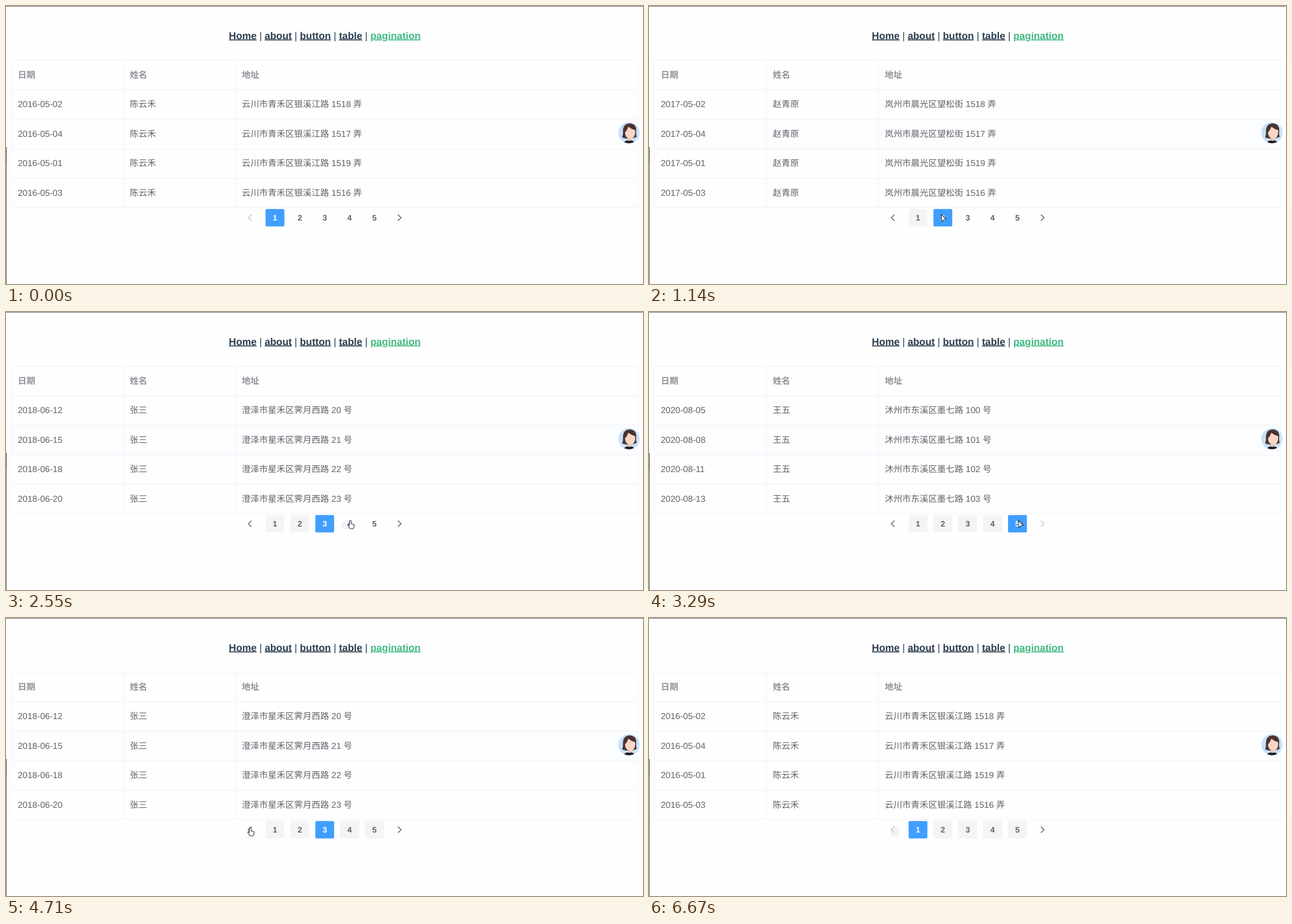
These frames come from a looping animation (1132x495 px, 6870 ms). An HTML page:

```html
<!DOCTYPE html>
<html lang="zh">
<head>
<meta charset="utf-8">
<title>Pagination</title>
<style>
  html, body { margin: 0; width: 100%; height: 100%; overflow: hidden; background: #fefefe; }
  svg { display: block; font: 15.5px "Liberation Sans", "Noto Sans CJK SC", "Noto Sans CJK", sans-serif; fill: #606266; text-rendering: geometricPrecision; }
  .nav { font-size: 17.7px; fill: #2c3e50; text-anchor: middle; }
  .nav tspan { font-weight: bold; text-decoration: underline; }
  .nav .on { fill: #42b983; }
  .head { font-weight: bold; fill: #909399; }
  .grid { fill: none; stroke: #eff1f6; }
  .num { font-size: 14.3px; font-weight: bold; text-anchor: middle; }
  .arrow { fill: none; stroke: #606266; stroke-width: 1.5; }
  .arrow.off { stroke: #c0c4cc; }
  .smudge { fill: #f2f2f2; }
  #cursor path { fill: #fff; stroke: #2b2b33; stroke-width: 1.1; stroke-linejoin: round; }
  #cursor .ban { stroke: #e0485e; stroke-width: 1.6; }
</style>
</head>
<body>
<svg id="stage" width="1132" height="495" viewBox="0 0 1132 495">
  <rect width="1132" height="1" fill="#6e6e70"/>
  <rect y="251" width="1" height="244" fill="#5c5c5e"/>
  <rect y="251" width="1" height="29" fill="#3d3436"/>
  <text class="nav" x="566.500" y="58.500"><tspan>Home</tspan> | <tspan>about</tspan> | <tspan>button</tspan> | <tspan>table</tspan> | <tspan class="on">pagination</tspan></text>

  <rect id="hover" x="10" width="1113" height="52" fill="#fbfdff"/>
  <path class="grid" d="M9.500 96.500H1123.500V358.500H9.500ZM9.500 149.500H1123M9.500 201.500H1123M9.500 254.500H1123M9.500 306.500H1123M208.500 96V358M407.500 96V358"/>
  <g id="table"></g>

  <g id="pager">
    <circle id="smudge4" class="smudge" cx="604" cy="379.500" r="7.500"/>
    <circle id="smudgePrev" class="smudge" cx="437.500" cy="382" r="8.500"/>
    <path id="prev" class="arrow" d="M436.200 371.500L430.700 377L436.200 382.500"/>
    <path id="next" class="arrow" d="M696.500 371.500L702 377L696.500 382.500"/>
  </g>

  <clipPath id="disc"><circle cx="1107" cy="225.700" r="18.800"/></clipPath>
  <g clip-path="url(#disc)">
    <rect x="1088" y="206" width="38" height="40" fill="#c6e1fd"/>
    <path d="M1095 234Q1097 228 1096.500 220Q1098 209 1109 209Q1120 210 1120 221Q1119 229 1121 233Q1108 239 1095 234Z" fill="#4b342f"/>
    <path d="M1097 246Q1098 239 1108 239Q1117 239 1118 246Z" fill="#1d1c20"/>
    <path d="M1105 232h6v7q-3 2.500-6 0Z" fill="#eebfa9"/>
    <path d="M1100 225Q1104 221 1106 215Q1111 219 1118 221Q1119 236 1109 236.500Q1100 235 1100 225Z" fill="#f8d5c4"/>
  </g>

  <g id="cursor">
    <path data-kind="arrow" d="M.5 0L9 8.500L5.200 9.300L1.500 13Z"/>
    <path data-kind="hand" d="M-.5 1.500a1.500 1.500 0 0 1 3 0v4.500l3.800 1q1.800.5 1.600 2.500l-.8 3.800q-.3 1.700-1.600 1.700h-4q-1 0-1.600-1l-3-4.800q-.5-1.600.8-1.700l1.800 1.500Z"/>
    <path data-kind="ban" class="ban" d="M-2.500 4a4.500 4.500 0 1 0 9 0a4.500 4.500 0 1 0 -9 0M-1.100 .9L5.100 7.100"/>
  </g>
</svg>
<script>
const LOOP = 6870, COLS = [21, 220, 419];
const $ = id => document.getElementById(id);

const pages = [
  { month: '2016-05', days: ['02', '04', '01', '03'], name: '陈云禾', road: '云川市青禾区银溪江路', nos: [1518, 1517, 1519, 1516], unit: '弄' },
  { month: '2017-05', days: ['02', '04', '01', '03'], name: '赵青原', road: '岚州市晨光区望松街', nos: [1518, 1517, 1519, 1516], unit: '弄' },
  { month: '2018-06', days: [12, 15, 18, 20], name: '张三', road: '澄泽市星禾区霁月西路', nos: [20, 21, 22, 23], unit: '号' },
  { month: '2019-07', days: [22, 25, 28, 30], name: '李四', road: '汐岭市澜山区禾苑园南路', nos: [50, 51, 52, 53], unit: '号' },
  { month: '2020-08', days: ['05', '08', 11, 13], name: '王五', road: '沐州市东溪区墨七路', nos: [100, 101, 102, 103], unit: '号' }
];

// [time, page]
const turns = [[0, 1], [1060, 2], [1890, 3], [2640, 4], [3290, 5], [4320, 4], [4710, 3], [4880, 2], [5360, 1]];

// Pointer moves: first step, last step, step count, end x, end y, downward bow
const moves = [
  [110, 750, 8, 519, 371, 0],
  [1150, 1710, 7, 563, 371, 0],
  [1980, 2250, 4, 611, 371, 0],
  [2730, 3100, 5, 656, 371, 0],
  [3380, 3950, 7, 434, 374, 11],
  [4040, 4140, 2, 433, 373, 0],
  [5640, 6290, 8, 797, 31, 0],
  [6390, 6670, 4, 789, -20, 0]
];

function add(parent, tag, attrs, text = '') {
  const el = document.createElementNS('http://www.w3.org/2000/svg', tag);
  for (const key in attrs) el.setAttribute(key, attrs[key]);
  el.textContent = text;
  return parent.appendChild(el);
}

['日期', '姓名', '地址'].forEach((label, c) => add($('table'), 'text', { class: 'head', x: COLS[c], y: 128 }, label));
const cells = [0, 1, 2, 3].map(r => COLS.map(x => add($('table'), 'text', { x, y: 180 + r * 52.6 })));

const buttons = [1, 2, 3, 4, 5].map(n => {
  const x = 478 + (n - 1) * 44.2;
  const box = add($('pager'), 'rect', { x: x - 16.7, y: 361.4, width: 33.4, height: 31.2, rx: 2 });
  const label = add($('pager'), 'text', { class: 'num', x, y: 382 }, n);
  return { n, x, box, label };
});
const kinds = [...$('cursor').children];
const show = (el, on) => { el.style.display = on ? '' : 'none'; };

function pointer(t) {
  let x = 790, y = 0;
  for (const [start, end, count, toX, toY, bow] of moves) {
    if (t < start) break;
    const step = Math.floor((t - start) * (count - 1) / (end - start) + 1e-6) + 1;
    const p = Math.min(1, step / count);
    x += (toX - x) * p;
    y += (toY - y) * p + bow * Math.sin(Math.PI * p);
  }
  return { x, y };
}

let shown = 0;
function fillTable(page) {
  if (page === shown) return;
  shown = page;
  const { month, days, name, road, nos, unit } = pages[page - 1];
  cells.forEach((row, r) => {
    [`${month}-${days[r]}`, name, `${road} ${nos[r]} ${unit}`].forEach((text, c) => { row[c].textContent = text; });
  });
}

function render(t) {
  const past = turns.filter(turn => turn[0] <= t);
  const page = past[past.length - 1][1];
  const reached = Math.max(...past.map(turn => turn[1]));
  const { x, y } = pointer(t);
  const inPager = y > 361 && y < 393;
  const over = center => inPager && Math.abs(x - center) < 16.5;
  fillTable(page);

  let kind = 'arrow';
  for (const b of buttons) {
    const active = b.n === page, hot = over(b.x);
    if (hot && !active) kind = 'hand';
    b.box.style.fill = active ? '#409eff' : b.n <= reached ? '#f4f4f5' : 'none';
    b.label.style.fill = active ? '#fff' : hot ? '#409eff' : '#606266';
  }
  if (over(433)) kind = page > 1 ? 'hand' : 'ban';
  $('prev').classList.toggle('off', page === 1);
  $('next').classList.toggle('off', page === 5);
  show($('smudge4'), t >= 2250 && t < 2640);
  show($('smudgePrev'), t >= 5360);

  // Row two keeps its tint while the pointer is on the pager
  const inTable = y > 149 && y < 359;
  const row = inTable ? Math.min(3, Math.floor((y - 149) / 52.4)) : t > 300 && t < 5640 ? 1 : -1;
  show($('hover'), row >= 0);
  $('hover').setAttribute('y', 149.5 + row * 52.4);

  show($('cursor'), t >= 110 && t < 6670);
  $('cursor').setAttribute('transform', `translate(${x} ${y})`);
  kinds.forEach(el => show(el, el.dataset.kind === kind));
}

function tick() {
  render(performance.now() % LOOP);
  requestAnimationFrame(tick);
}
tick();
</script>
</body>
</html>
```
